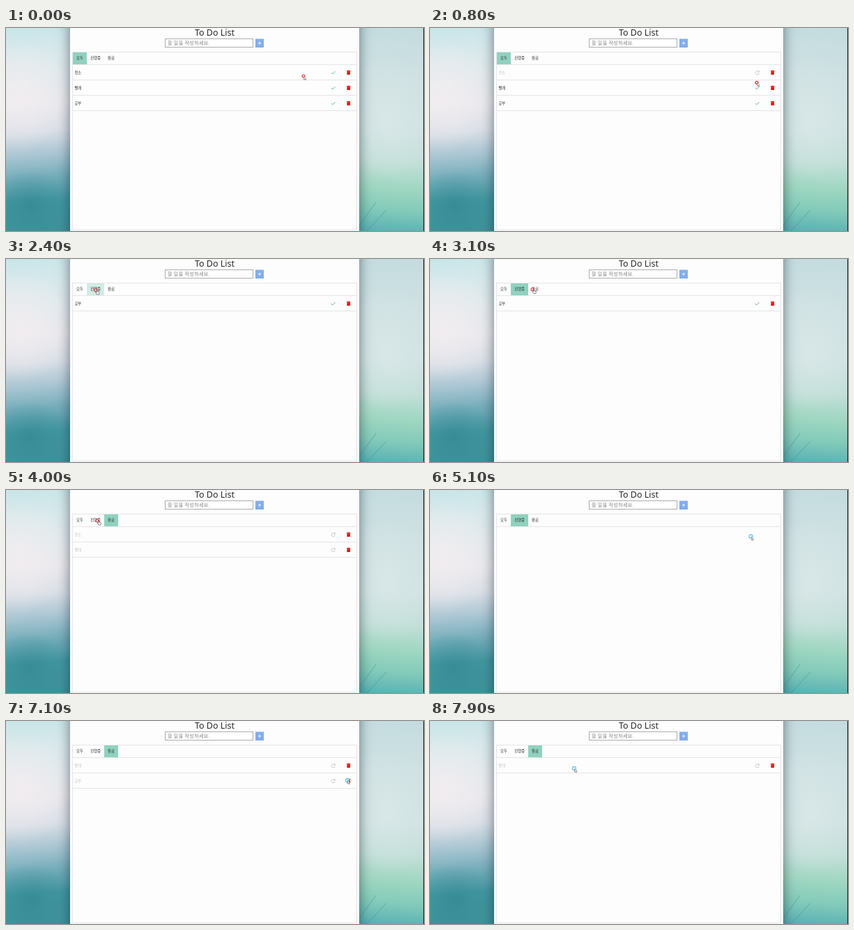
Recreate the animation shown at these times as an HTML page. Size 600 by 291 pixels, loop 8000 ms.

```html
<!DOCTYPE html>
<html lang="en">
<head>
<meta charset="utf-8">
<title>To Do List</title>
<style>
  html, body { margin: 0; width: 100%; height: 100%; overflow: hidden; }
  body { position: relative; background: #c4d8db; }
  .side { position: absolute; top: 0; bottom: 0; }
  .left {
    left: 0; width: 92px;
    background:
      radial-gradient(75px 80px at 20px 95px, rgba(243,238,241,.85), transparent),
      radial-gradient(60px 50px at 35px 255px, rgba(42,130,138,.55), transparent),
      linear-gradient(176deg, #c8e5e8 0, #dae9ec 14%, #e9e8ec 38%, #d9dee6 51%, #abc6d3 62%, #75adba 73%, #479aa4 84%, #3f929b 100%);
  }
  .right {
    left: 507px; width: 93px;
    background:
      radial-gradient(70px 90px at 40px 130px, rgba(222,234,234,.6), transparent),
      linear-gradient(184deg, #c4dcdf 0, #cfe1e3 25%, #cfe2e2 50%, #c1dfd7 66%, #9cd6c0 79%, #82cab9 89%, #58b0b5 100%);
  }
  .panel {
    position: absolute; left: 92px; top: -30px; width: 415px; height: 351px;
    background: #fefdfe; box-shadow: 0 0 17px rgba(15,30,38,.55);
  }
  svg { position: absolute; left: 0; top: 0; width: 600px; height: 291px; }
  text { font-family: "Noto Sans CJK KR", "Noto Sans CJK", "Noto Sans", sans-serif; fill: #2a2a2a; }
  .title { font: 12.5px "Noto Sans", sans-serif; }
  .hint { font-size: 7px; letter-spacing: .4px; fill: #808080; }
  .mid { text-anchor: middle; }
  .tab { font-size: 5.4px; }
  .item { font-size: 5.2px; }
  .done .item { fill: #c4c4c4; }
  .rule { stroke: #e5e5e5; fill: none; }
</style>
</head>
<body>
<div class="side left"></div>
<div class="side right"></div>
<div class="panel"></div>
<svg viewBox="0 0 600 291">
  <defs>
    <path id="check" d="M-2.8 .1 L-1 1.9 L2.8 -1.9" fill="none" stroke="#4ab882" stroke-width=".95"/>
    <g id="redo" fill="none" stroke="#bdbdbd" stroke-width=".8">
      <path d="M1.8 -1.8 A2.6 2.6 0 1 0 2.5 .8"/>
      <path d="M2.6 -2.9 V-.8 H.5"/>
    </g>
    <path id="trash" d="M-2.7 -2.9 H-1.2 L-.7 -3.3 H.7 L1.2 -2.9 H2.7 V-2.1 H-2.7 Z M-2.3 -1.7 H2.3 V2.3 Q2.3 3 1.6 3 H-1.6 Q-2.3 3 -2.3 2.3 Z" fill="#f40d0d"/>
  </defs>
  <path d="M507 283 L531 250 M518 291 L546 261" stroke="#39848b" stroke-width=".8" opacity=".6"/>
  <path d="M599.5 0 V291" stroke="#1c2a2d"/>
  <text class="title mid" x="299.5" y="10.7">To Do List</text>
  <rect x="228.5" y="15.5" width="126" height="12" fill="#fff" stroke="#a9adb0"/>
  <text class="hint" x="232" y="24.3">할 일을 작성하세요.</text>
  <rect x="358" y="15.5" width="12" height="12.5" fill="#83aee9"/>
  <path d="M362 21.7 H366 M364 19.7 V23.7" stroke="#fff" stroke-width=".9"/>
  <rect id="mark" y="35" height="17.5" fill="#8fd2bf"/>
  <rect class="rule" x="95.5" y="34.5" width="408" height="255"/>
  <path class="rule" d="M96 52.5 H503"/>
  <text class="tab mid" x="106" y="45.4">모두</text>
  <text class="tab mid" x="128.6" y="45.4">진행중</text>
  <text class="tab mid" x="151" y="45.4">완료</text>
  <g id="list"></g>
  <g id="cursor">
    <circle id="ring" fill="#fff" fill-opacity=".75"/>
    <path id="arrow" d="M.6 .4 V5.2 L1.8 4.2 L2.6 5.9 L3.4 5.5 L2.6 3.9 H4.1 Z" fill="#fff" stroke="#444" stroke-width=".5"/>
    <path id="hand" d="M1.2 0 Q2.1 -.7 2.4 .3 V2.1 L4.9 2.7 Q5.5 3 5.3 4 L4.7 6.2 H2 L.1 3.6 Q.4 2.7 1.3 3.5 Z" fill="#fff" stroke="#333" stroke-width=".6"/>
  </g>
</svg>
<script>
const LOOP = 8000, STEP = 100;
const $ = id => document.getElementById(id);
const tabs = [[96, 20], [116, 25], [141, 20]];

// time, selected tab
const picks = [[0, 0], [2400, 1], [3300, 2], [4200, 1], [6000, 2]];

// time, rows ("-" marks a finished one)
const lists = [
  [0, "청소 빨래 공부"],
  [600, "-청소 빨래 공부"],
  [1100, "-청소 -빨래 공부"],
  [2400, "공부"],
  [3300, "-청소 -빨래"],
  [4200, "공부"],
  [5000, ""],
  [6000, "-청소 -빨래 -공부"],
  [6800, "-빨래 -공부"],
  [7600, "-빨래"]
];

// time, x, y of the pointer
const path = [
  [0, 427, 69], [400, 467, 65], [600, 469, 65], [900, 469, 85], [1100, 467, 87],
  [1700, 220, 87], [1850, 190, 82], [2300, 129, 45], [2600, 128, 44], [3100, 147, 43.5],
  [3600, 149, 44], [4000, 131, 44], [4200, 130, 44], [4700, 463, 66], [5100, 460.5, 66.5],
  [5300, 440, 67], [5800, 154, 45], [6000, 152, 45], [6200, 346, 82], [6500, 488, 65],
  [6800, 490, 65], [7100, 490, 85], [7600, 489, 86], [7900, 207, 68]
];

const last = (list, t) => list.findLastIndex(k => k[0] <= t);

function pointer(t) {
  const i = last(path, t), a = path[i], b = path[i + 1] || a;
  const k = a === b ? 0 : (t - a[0]) / (b[0] - a[0]);
  return [1, 2].map(n => a[n] + (b[n] - a[n]) * k);
}

function row(name, i) {
  const done = name[0] === "-", y = 64 + 22 * i;
  return `<g class="${done ? "done" : ""}">
    <text class="item" x="98.6" y="${y + 1.8}">${name.replace("-", "")}</text>
    <use href="#${done ? "redo" : "check"}" x="469.8" y="${y}"/>
    <use href="#trash" x="491.7" y="${y}"/>
    <path class="rule" d="M96 ${y + 10.5} H503"/></g>`;
}

function set(el, attrs) {
  for (const k in attrs) el.setAttribute(k, attrs[k]);
}

let shown = -1;
function draw(now) {
  const t = Math.floor(now % LOOP / STEP) * STEP;
  const n = last(lists, t), rows = lists[n][1];
  if (n !== shown) {
    $("list").innerHTML = rows ? rows.split(" ").map(row).join("") : "";
    shown = n;
  }

  const [since, tab] = picks[last(picks, t)];
  set($("mark"), {
    x: tabs[tab][0], width: tabs[tab][1],
    opacity: since ? Math.min(1, .4 + (t - since) / 500) : 1
  });

  const [x, y] = pointer(t), blue = t >= 4700, onTab = y < 52 && x < 161;
  set($("cursor"), { transform: `translate(${x} ${y})` });
  set($("ring"), {
    r: blue ? 2.5 : 2, stroke: blue ? "#7cc5ec" : "#e02a32", "stroke-width": blue ? 1.4 : 1.2
  });
  set($("arrow"), { visibility: onTab ? "hidden" : "visible" });
  set($("hand"), { visibility: onTab ? "visible" : "hidden" });
  requestAnimationFrame(draw);
}
requestAnimationFrame(draw);
</script>
</body>
</html>
```
